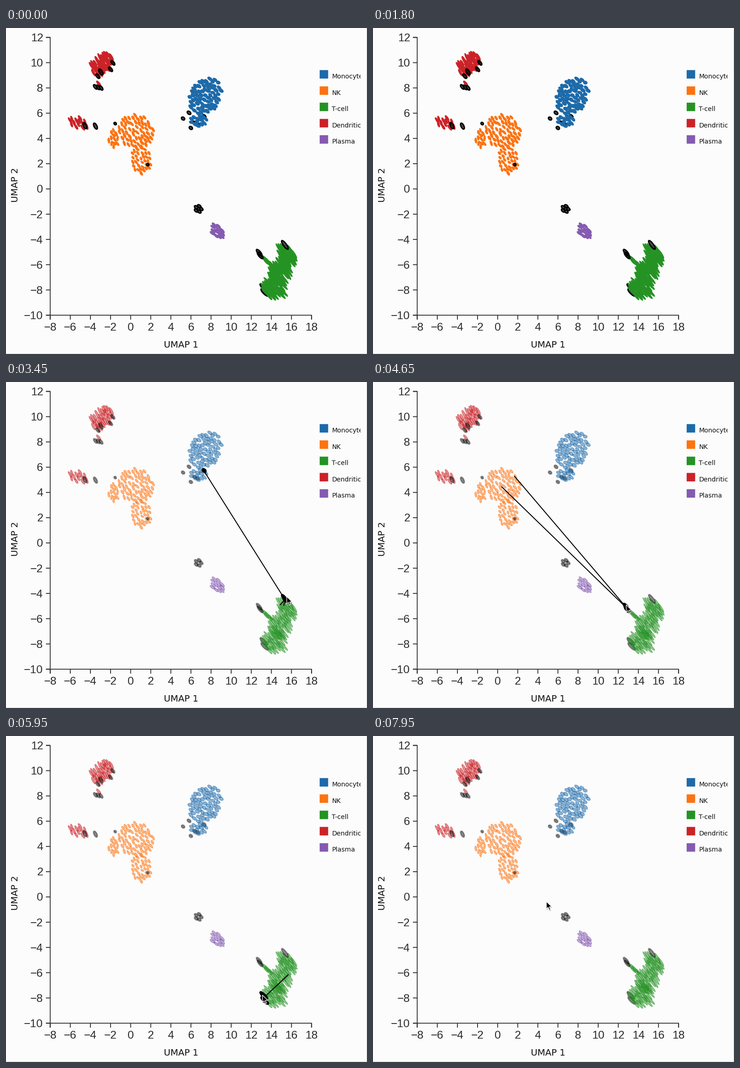
Animation of 787x711 px, one loop 8 s. Source, as a matplotlib script:

```python
import math
import random

import matplotlib.pyplot as plt
import numpy as np
from matplotlib.animation import FuncAnimation
from matplotlib.collections import EllipseCollection
from matplotlib.patches import Polygon, Rectangle

W, H, DPI = 787, 711, 100
STEP, FRAMES = 50, 160
INK = "#2b2b2b"
BLUE, ORANGE, GREEN, RED, PURPLE = "#1d6aa9", "#fd7311", "#259324", "#cb2227", "#855ab1"

fig = plt.figure(figsize=(W / DPI, H / DPI), dpi=DPI, facecolor="#fcfcfc")
ax = fig.add_axes([0, 0, 1, 1])
ax.set_xlim(0, W)
ax.set_ylim(H, 0)
ax.axis("off")


def px(size):
    return size * 72 / DPI


def line(xs, ys, color=INK, width=1.8, z=1):
    return ax.plot(xs, ys, color=color, lw=px(width), zorder=z, snap=False,
                   solid_capstyle="butt")[0]


def text(x, y, s, size, family="Liberation Sans", color=INK, **kw):
    return ax.text(x, y, s, fontsize=px(size), family=family, color=color, **kw)


def ellipses(items, color, z, width):
    """items: rows of centre x, centre y, half length, half width, angle."""
    a = np.array(items, float)
    coll = EllipseCollection(2 * a[:, 2], 2 * a[:, 3], a[:, 4], units="xy",
                             offsets=a[:, :2], offset_transform=ax.transData,
                             facecolors=color, edgecolors=color,
                             linewidths=px(width), zorder=z)
    ax.add_collection(coll)
    return coll


def turn(dx, dy, angle):
    c, s = math.cos(math.radians(angle)), math.sin(math.radians(angle))
    return dx * c + dy * s, dy * c - dx * s


def fill_blob(blob, count, rx, ry, angle, gap, seed, jitter=8):
    """Spread ellipses over a tilted oval, keeping an elliptical gap between them."""
    cx, cy, a, b, tilt = blob
    rng = random.Random(seed)
    out = []
    for _ in range(5000):
        r, phi = math.sqrt(rng.random()), rng.uniform(0, math.tau)
        dx, dy = turn(a * r * math.cos(phi), b * r * math.sin(phi), -tilt)
        x, y = cx + dx, cy + dy
        offsets = (turn(x - e[0], y - e[1], angle) for e in out)
        if any(math.hypot(u / gap[0], v / gap[1]) < 1 for u, v in offsets):
            continue
        out.append((x, y, rx * rng.uniform(0.8, 1.15), ry * rng.uniform(0.85, 1.1),
                    angle + rng.uniform(-jitter, jitter)))
        if len(out) == count:
            break
    return out


# Axes
X0, X1, Y0, Y1 = 96.4, 666.2, 20.5, 626.4
line([87, X0, X0, 87], [Y0, Y0, Y1, Y1])
line([X0, X0, X1, X1], [636, Y1, Y1, 636])
for v in range(-10, 13, 2):
    y = Y0 + (12 - v) * (Y1 - Y0) / 22
    line([87, X0], [y, y])
    text(81, y + 8.5, str(v).replace("-", "\u2212"), 24.5, ha="right")
for v in range(-8, 19, 2):
    x = X0 + (v + 8) * (X1 - X0) / 26
    line([x, x], [Y1, 636])
    text(x, 660.5, str(v).replace("-", "\u2212"), 24.5, ha="center")
text(381.5, 697, "UMAP 1", 19.8, "DejaVu Sans", "#111111", ha="center")
text(26, 342, "UMAP 2", 19.8, "DejaVu Sans", "#111111", rotation=90,
     ha="center", va="baseline", rotation_mode="anchor")
line([786.5, 786.5], [0, H], "#cfcfcf", 1)
line([0, W], [710.5, 710.5], "#cfcfcf", 1)

# Legend, cut off at the right
window = Rectangle((0, 0), 772.5, H, transform=ax.transData)
for i, (name, color) in enumerate([("Monocyte", BLUE), ("NK", ORANGE), ("T-cell", GREEN),
                                   ("Dendritic", RED), ("Plasma", PURPLE)]):
    y = 91.8 + 35.5 * i
    ax.add_patch(Rectangle((683.8, y), 18.5, 18.5, fc=color, lw=0, snap=False))
    t = text(710.2, y + 18.3, name, 14, "DejaVu Sans", "#111111", clip_on=True)
    t.set_clip_path(window)

# Clusters
mono = fill_blob((434, 149, 42, 31, -55), 125, 5.4, 3.2, 35, (7.8, 6), 4, 16)
mono += fill_blob((418, 203, 20, 11, 0), 24, 5.4, 3.2, 35, (7.5, 6), 2, 16)
nk = fill_blob((283, 226, 38, 36, 0), 100, 5.6, 2.3, 58, (9.6, 6.2), 9, 16)
nk += fill_blob((234, 242, 10, 19, 0), 20, 5.2, 2.2, 72, (8.5, 5.6), 3, 35)
nk += fill_blob((294, 288, 22, 29, 0), 58, 4.5, 2.2, 52, (7.8, 5.8), 6, 22)
tcell = fill_blob((613, 495, 21, 14, 40), 34, 13, 2.2, 54, (12, 4), 12, 5)
tcell += fill_blob((597, 532, 25, 20, -55), 52, 13, 2.2, 54, (12, 4), 5, 5)
tcell += fill_blob((586, 566, 24, 19, -20), 52, 13, 2.2, 50, (12, 4), 7, 5)
tcell += fill_blob((569, 508, 13, 3, 42), 7, 9, 2, 48, (6, 4), 1, 5)
dend = fill_blob((208, 79, 28, 16, -42), 58, 9, 2.3, 58, (10, 4.2), 5)
dend += fill_blob((158, 207, 20, 11, 15), 24, 7, 2.2, 62, (9.5, 5), 8, 10)
dend += [(202, 121, 7, 2.4, 50)]
plasma = fill_blob((460, 443, 18, 11, 58), 34, 6.5, 2.5, 42, (9, 4.8), 2)


# Marked cells
def marks(points, rx, ry, angle):
    return [(x, y, rx, ry, angle) for x, y in points]


top_t = marks([(608, 473)], 11.5, 3.4, 54)
left_t = marks([(552, 490), (554, 496)], 9, 3.2, 50)
low_t = marks([(562, 566), (564, 577)], 11, 3.4, 44)
clump = marks([(419.5 + 6 * math.cos(k * math.tau / 5), 394.5 + 6 * math.sin(k * math.tau / 5))
               for k in range(5)], 4.6, 2.8, 40)
far_mono = marks([(432, 193)], 4.6, 3.2, 42)
back = low_t + far_mono + marks([(399, 185), (411, 207), (418, 210)], 4.6, 3, 40)
front = (top_t + left_t + clump
         + marks([(386, 197.5), (403, 218)], 4, 3, 38)
         + marks([(233, 76), (228, 90), (200, 105)], 6, 2.8, 52)
         + marks([(195 + 6 * k, 128.5 + k) for k in range(3)], 6, 2.8, 52)
         + marks([(207, 96)], 7.5, 3.4, 58)
         + marks([(195, 214), (172, 213)], 7.2, 3.2, 64)
         + marks([(238, 208.5), (309, 298)], 3, 2.4, 48))

cells = [ellipses(items, color, 3, 1.4) for items, color in
         [(mono, BLUE), (nk, ORANGE), (tcell, GREEN), (dend, RED), (plasma, PURPLE)]]
rings = [ellipses(back, "k", 2, 2.8), ellipses(front, "k", 4, 2.8)]


# Visits: pointer place, time of leaving, cells turned black, link lines
def head(x, y):
    return [(x - 10, y + 12), (x, y), (x - 1, y + 13)]


VISITS = [
    ((612, 468), 3600, top_t + far_mono, [[(431, 193), (606, 471)], head(607, 475)]),
    ((552, 486), 4950, left_t, [[(308, 205), (550, 489)], [(280, 228), (552, 492)]]),
    ((559, 565), 6150, low_t, [[(616, 520), (565, 568)]]),
    ((419, 397), 7150, clump, [[(450, 429), (421, 397)]]),
]
hovers = []
for spot, _, items, links in VISITS:
    parts = [ellipses(items, "k", 6, 2.6)]
    parts += [line(*zip(*pts), color="k", width=2, z=7) for pts in links]
    hovers.append((spot, parts))

# Pointer
ARROW = np.array([(0, 0), (0, 16), (3.7, 12.6), (6.4, 18.8), (9, 17.6), (6.4, 11.6), (11.6, 11.4)])
shadow = Polygon(ARROW, fc="k", ec="k", alpha=0.15, lw=px(2), zorder=8)
arrow = Polygon(ARROW, fc="k", ec="w", lw=px(1.3), zorder=9, joinstyle="miter")
ax.add_patch(shadow)
ax.add_patch(arrow)

ENTER, TRAVEL, REACH = 2000, 500, 12
PLACES = [(800, 420)] + [v[0] for v in VISITS] + [(378, 361)]
LEAVES = [ENTER] + [v[1] for v in VISITS]


def pointer(ms):
    pos = np.array(PLACES[0], float)
    for leave, a, b in zip(LEAVES, PLACES, PLACES[1:]):
        k = min(max((ms - leave) / TRAVEL, 0), 1)
        pos += np.subtract(b, a) * k * k * (3 - 2 * k)
    return pos


def update(i):
    ms = i * STEP
    pos = pointer(ms)
    arrow.set_xy(ARROW + pos)
    shadow.set_xy(ARROW + pos + (0.5, 1.5))
    dim = ms >= ENTER + TRAVEL
    for c in cells:
        c.set_alpha(0.5 if dim else 1)
    for r in rings:
        r.set_facecolor((0, 0, 0, 0.45 if dim else 0.7))
        r.set_edgecolor((0, 0, 0, 0.35 if dim else 1))
    for spot, parts in hovers:
        on = dim and math.dist(pos, spot) < REACH
        for p in parts:
            p.set_visible(on)
    return []


anim = FuncAnimation(fig, update, frames=FRAMES, interval=STEP, repeat=True,
                     repeat_delay=0, blit=False)
plt.show()
```
